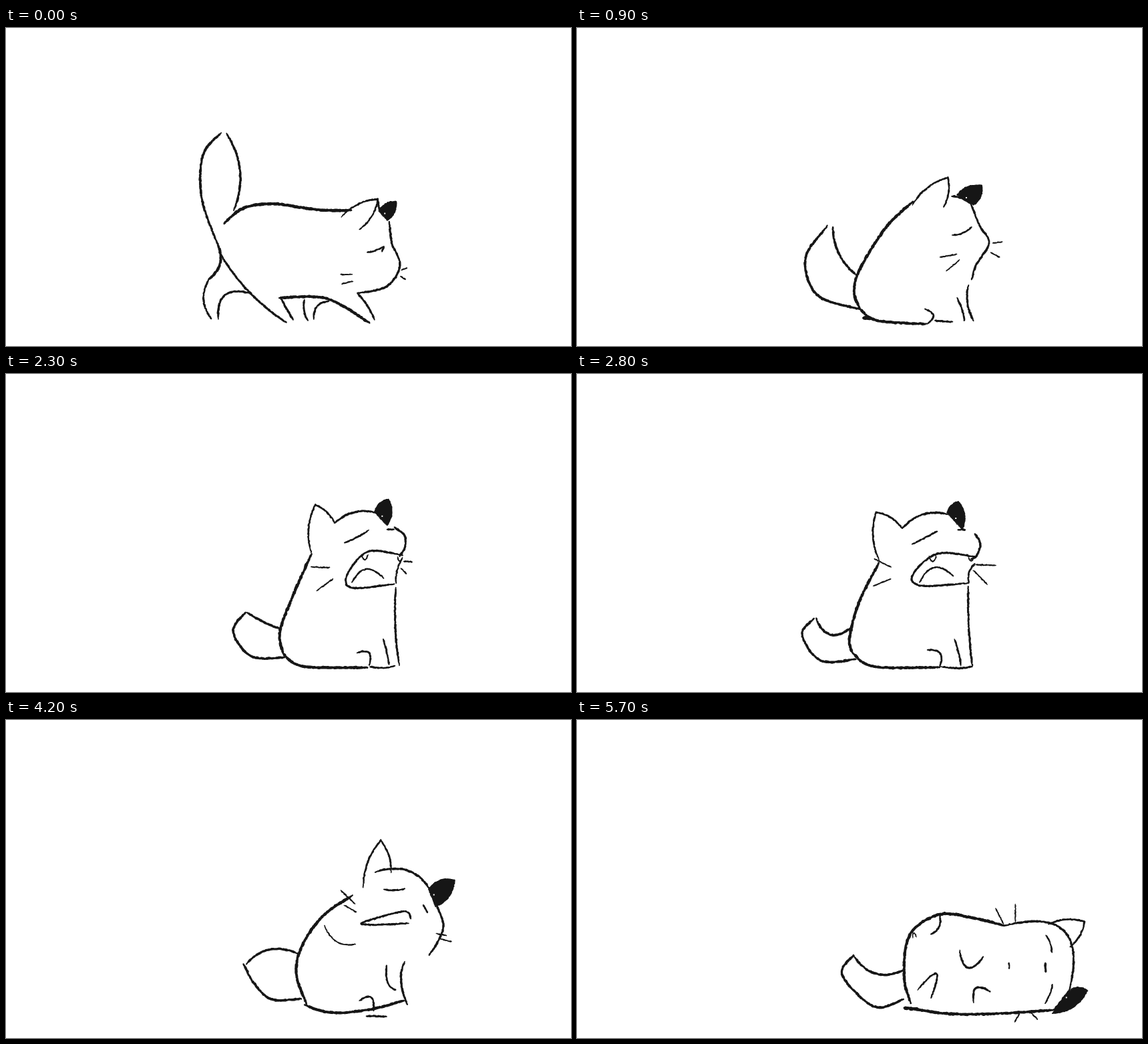
Animation, 846 px wide and 476 px high, one loop 5800 ms. Source, as an HTML page with a canvas:

```html
<!DOCTYPE html>
<html lang="en">
<head>
<meta charset="utf-8">
<title>Cat sits, yawns and rolls over</title>
<style>
html, body { margin: 0; width: 100%; height: 100%; overflow: hidden; background: #fff; }
canvas { display: block; width: 846px; height: 476px; }
</style>
</head>
<body>
<canvas id="stage" width="846" height="476"></canvas>
<script>
const ctx = document.getElementById('stage').getContext('2d');
const LOOP = 5800, STEP = 100, GROUND = 440, SAMPLES = 32;
const INK = '#161616', PAPER = '#fff';

const mix = (a, b, t) => a + (b - a) * t;
const sample = f => Array.from({ length: SAMPLES + 1 }, (_, i) => f(i / SAMPLES));
const rand = n => { const v = Math.sin(n * 12.9898) * 43758.5453; return v - Math.floor(v); };

// Smooth curve through a few key points (Catmull-Rom).
function path(...n) {
  const last = n.length / 2 - 1;
  const at = (i, j) => n[2 * Math.max(0, Math.min(last, i)) + j];
  return sample(v => {
    const k = Math.min(Math.floor(v * last), last - 1), t = v * last - k;
    return [0, 1].map(j => {
      const [a, b, c, d] = [k - 1, k, k + 1, k + 2].map(i => at(i, j));
      return b + t * (c - a + t * (2 * a - 5 * b + 4 * c - d + t * (3 * b - a - 3 * c + d))) / 2;
    });
  });
}

// Arc from one point to another; bend is its height relative to the chord.
function bow(x1, y1, x2, y2, bend = 0) {
  return sample(t => {
    const h = 4 * bend * t * (1 - t);
    return [mix(x1, x2, t) - (y2 - y1) * h, mix(y1, y2, t) + (x2 - x1) * h];
  });
}

// Two bulging sides that meet at the tip.
const ear = bulge => (x1, y1, tx, ty, x2, y2) =>
  [...bow(x1, y1, tx, ty, -bulge), ...bow(tx, ty, x2, y2, -bulge)];

// One of a pair of whiskers: the second is set aside by gap and fanned out.
const whisker = second => (x, y, angle, len, gap, fan) => {
  const rad = Math.PI / 180, side = (angle + fan / 2) * rad;
  const a = (angle + second * fan) * rad, cx = Math.cos(a) * len / 2, cy = Math.sin(a) * len / 2;
  const mx = x - second * gap * Math.sin(side), my = y + second * gap * Math.cos(side);
  return bow(mx - cx, my - cy, mx + cx, my + cy);
};

// Poses: walk, sit, yawn, wide yawn, mouth closing, on its side, on its back.
const parts = [];
function part(kind, width, rule, ...poses) {
  parts.push({ kind, width, poses: poses.map(s => s && rule(...s.split(' ').map(Number))) });
}
const line = (width, rule, ...poses) => part('line', width, rule, ...poses);
function whiskers(kind, ...poses) {
  for (const second of [0, 1]) part(kind, 2.2, whisker(second), ...poses);
}

// Tail
part('tail', 3.8, path,
  '322 157 295 190 293 255 316 322', '375 296 342 345 360 400 424 421',
  '363 346 344 380 370 415 417 421', '355 366 337 390 365 429 418 427',
  '329 390 333 421 365 436 420 424', '407 341 445 356 460 390 484 411',
  '414 352 397 382 445 429 489 418');
part('tail', 3.6, bow,
  '330 158 341 273 -.13', '383 298 420 371 .12', '364 346 409 382 -.3', '358 366 410 380 .33',
  '335 390 417 381 -.08', '407 340 477 317 -.35', '414 352 490 374 .22');

// Body
line(4.4, path,
  '517 273 465 272 400 263 355 270 326 293', '503 260 463 298 424 360 415 395 424 421',
  '464 253 443 310 413 372 417 418', '452 283 423 340 408 395 413 418',
  '463 283 435 332 416 390 424 426', '626 276 540 287 482 322 471 365 500 428',
  '640 308 600 298 543 291 498 322 490 385 500 425');
line(4.2, path,
  '409 404 480 405 545 442', '424 421 450 438 524 443', '417 418 445 437 540 440',
  '413 418 445 438 543 439', '420 428 460 440 530 443',
  '500 428 560 441 650 421 722 382', '496 431 560 440 640 439 715 434');
line(5, bow, '', '428 434 440 435', '', '', '', '486 436 518 439', '490 431 510 433');

// Walking legs
line(4, bow, '316 322 304 376 -.2');
line(3.2, bow, '304 376 308 436 .17');
line(3.4, bow, '319 335 420 441 .06');
line(3.4, bow, '318 436 365 397 -.35');
line(3.4, bow, '411 404 430 437');

// Hind paws
line(3, bow,
  '461 436 484 409 -.25', '521 421 524 443 -.5', '527 422 545 434 -.6', '525 413 543 438 -.4',
  '529 421 545 441 -.5', '529 425 560 427 -.6', '510 404 530 416 -1.5');
line(3, bow, '', '', '', '', '', '504 371 538 360 .55', '543 292 530 321 -.2');
line(2.2, bow, '', '', '', '', '', '', '503 326 508 325 -1.4');

// Front legs and toes
line(3.3, bow,
  '526 397 552 437 -.05', '586 385 594 438 .1', '581 322 585 436 .04', '586 318 592 437 .02',
  '597 343 594 442 .05', '598 420 614 400 -.65', '594 423 619 407 -.55');
line(3.2, bow,
  '447 407 452 438 .1', '569 404 580 438 -.05', '564 397 571 433 -.03', '565 397 575 437 -.03',
  '566 402 576 440 -.03', '577 324 598 346 .8', '573 345 609 354 .6');
line(3, bow, '', '536 438 562 440', '545 438 572 435 .1', '545 438 592 438 .05', '540 443 570 444');

// Head
line(3.4, bow,
  '557 258 563 276 .1', '561 252 590 264 -.1', '498 214 552 205 -.12', '487 231 555 210 -.15',
  '514 236 584 232 -.07', '628 274 731 350 -.3', '640 308 737 405 -.42');
line(3.4, path,
  '574 290 578 323 590 355 570 387 526 397', '590 264 603 296 617 322 598 354 591 377',
  '565 219 588 226 596 245 588 268', '596 239 604 255 598 272 590 277',
  '586 234 602 258 620 290 612 318 597 343', '731 350 722 380 705 395', '737 405 715 434');
line(2.9, ear(0.1),
  '502 283 557 256 529 302', '502 265 555 224 549 268', '463 255 481 183 498 214',
  '453 280 448 207 487 231', '468 273 494 195 514 236', '663 264 690 229 696 277',
  '706 306 760 302 738 340');
part('fill', 2, ear(0.15),
  '558 274 584 260 571 288', '569 250 606 236 594 265', '549 205 575 183 563 220',
  '554 208 571 191 577 233', '582 231 622 211 602 249', '729 350 768 354 722 385',
  '740 403 764 405 712 439');

// Eyes, nose and mouth
line(2.8, bow,
  '541 336 566 327 .05', '562 310 591 298 .1', '513 249 547 231 .1', '502 255 540 235',
  '507 269 547 255 .08', '677 279 693 303 -.08', '702 322 711 348 -.08');
line(2.8, bow, '566 327 563 335', '', '', '570 233 581 233', '579 264 590 264',
  '713 350 709 380 -.03', '712 396 701 424 -.05');
line(3.4, bow, '', '', '', '', '', '695 321 698 335', '701 364 702 377');
line(2.4, bow, '', '', '', '', '', '650 343 651 349', '647 364 647 372');
line(3.2, path, '', '', '588 268 545 262 521 300 522 324 577 316',
  '598 274 540 269 503 300 515 317 586 313', '606 312 595 302 534 317 550 320 603 318');
line(2.7, bow, '', '', '588 270 580 312', '596 284 587 314 .15');
line(2.7, bow, '', '', '524 312 567 309 -.35', '513 312 564 303 -.35');
line(2.2, bow, '', '', '539 268 547 268 .9', '527 272 538 272 .8');
line(2.2, bow, '', '', '', '586 274 594 274 .75');
line(2.2, bow, '', '', '', '', '477 321 524 346 .2');

// x, y, angle, length, gap and fan of each pair
whiskers('line',
  '510 369 0 18 12 -13', '556 341 -10 26 16 -30', '486 297 -22 34 28 -28',
  '458 283 27 28 29 -49', '455 291 32 30 28 -30', '621 267 61 26 -28 34', '633 294 64 27 -24 26');
whiskers('whisker',
  '596 361 -18 9 13 52', '630 321 -8 15 19 39', '610 276 5 32 24 37',
  '612 286 2 30 20 43', '629 292 -17 19 18 19', '696 412 57 22 -18 -23', '659 446 120 15 -26 -72');

// When the cat reaches each pose.
const keys = [[0, 0], [600, 1], [900, 1], [1700, 2], [2800, 3], [3600, 4],
  [4300, 4.4], [4800, 5], [5400, 5.85], [5700, 6]];

function poseAt(time) {
  const i = Math.max(1, keys.findIndex(k => k[0] >= time));
  const [t0, p0] = keys[i - 1], [t1, p1] = keys[i];
  return mix(p0, p1, (time - t0) / (t1 - t0));
}

function stateAt(time) {
  const bump = (mid, reach) => Math.max(0, 1 - Math.abs(time - mid) / reach);
  return {
    pose: poseAt(time),
    lean: 0.155 * bump(600, 300),
    stretch: 1 + 0.04 * bump(100, 100) + 0.05 * bump(600, 300) + 0.14 * bump(4300, 500),
    turn: -0.15 * bump(1200, 300) - 0.25 * bump(5100, 300),
    reach: 1 - 0.6 * Math.min(1, 3 * bump(2150, 450))
  };
}

function shape(p, s) {
  const k = Math.min(5, Math.floor(s.pose)), t = s.pose - k;
  const a = p.poses[k], b = p.poses[k + 1];
  let pts = t < 0.5 ? a : b;
  if (a && b) pts = a.map((v, i) => [mix(v[0], b[i][0], t), mix(v[1], b[i][1], t)]);
  if (!pts) return null;
  const [rx, ry] = p.kind === 'whisker' ? pts[0] : pts[pts.length - 1];
  const turn = p.kind === 'tail' ? s.turn : 0, size = p.kind === 'whisker' ? s.reach : 1;
  const c = Math.cos(turn) * size, n = Math.sin(turn) * size;
  return pts.map(([px, py]) => {
    const x = rx + (px - rx) * c - (py - ry) * n, y = ry + (px - rx) * n + (py - ry) * c;
    const h = GROUND - y;
    return [x + s.lean * h, h > 0 ? GROUND - h * s.stretch : y];
  });
}

// Rough ink: overlapping dots of uneven size that wander off the line.
function inkLine(pts, width, seed) {
  let d = 0;
  ctx.beginPath();
  for (let i = 1; i < pts.length; i++) {
    const [x1, y1] = pts[i - 1], [x2, y2] = pts[i];
    const len = Math.hypot(x2 - x1, y2 - y1);
    for (let u = 0; u < len; u += 0.8) {
      const end = Math.min(i - 1 + u / len, pts.length - i - u / len) / pts.length;
      const grain = seed * 31 + Math.floor((d + u) / 2.2);
      const r = width / 2 * Math.min(1, 0.65 + end * 4) * (0.75 + 0.4 * rand(grain));
      const x = mix(x1, x2, u / len) + 0.8 * (rand(grain + 0.3) - 0.5);
      const y = mix(y1, y2, u / len) + 0.8 * (rand(grain + 0.6) - 0.5);
      ctx.moveTo(x + r, y);
      ctx.arc(x, y, r, 0, 7);
    }
    d += len;
  }
  ctx.fill();
}

function inkFill(pts, width, seed) {
  ctx.beginPath();
  pts.forEach(([x, y]) => ctx.lineTo(x, y));
  ctx.closePath();
  ctx.fill();
  inkLine([...pts, pts[0]], width, seed);
  const [x1, y1] = pts[0], [x2, y2] = pts[pts.length - 1];
  ctx.fillStyle = PAPER;
  ctx.fillRect(mix(x1, x2, 0.4) + 3, mix(y1, y2, 0.4) - 3, 2, 2);
  ctx.fillStyle = INK;
}

function draw(step) {
  const s = stateAt(step * STEP);
  ctx.fillStyle = PAPER;
  ctx.fillRect(0, 0, 846, 476);
  ctx.fillStyle = INK;
  parts.forEach((p, i) => {
    const pts = shape(p, s);
    if (pts) (p.kind === 'fill' ? inkFill : inkLine)(pts, p.width, i * 7 + step);
  });
}

let shown = -1;
function tick() {
  const step = Math.floor(performance.now() % LOOP / STEP);
  if (step !== shown) draw(shown = step);
  requestAnimationFrame(tick);
}
tick();
</script>
</body>
</html>
```
